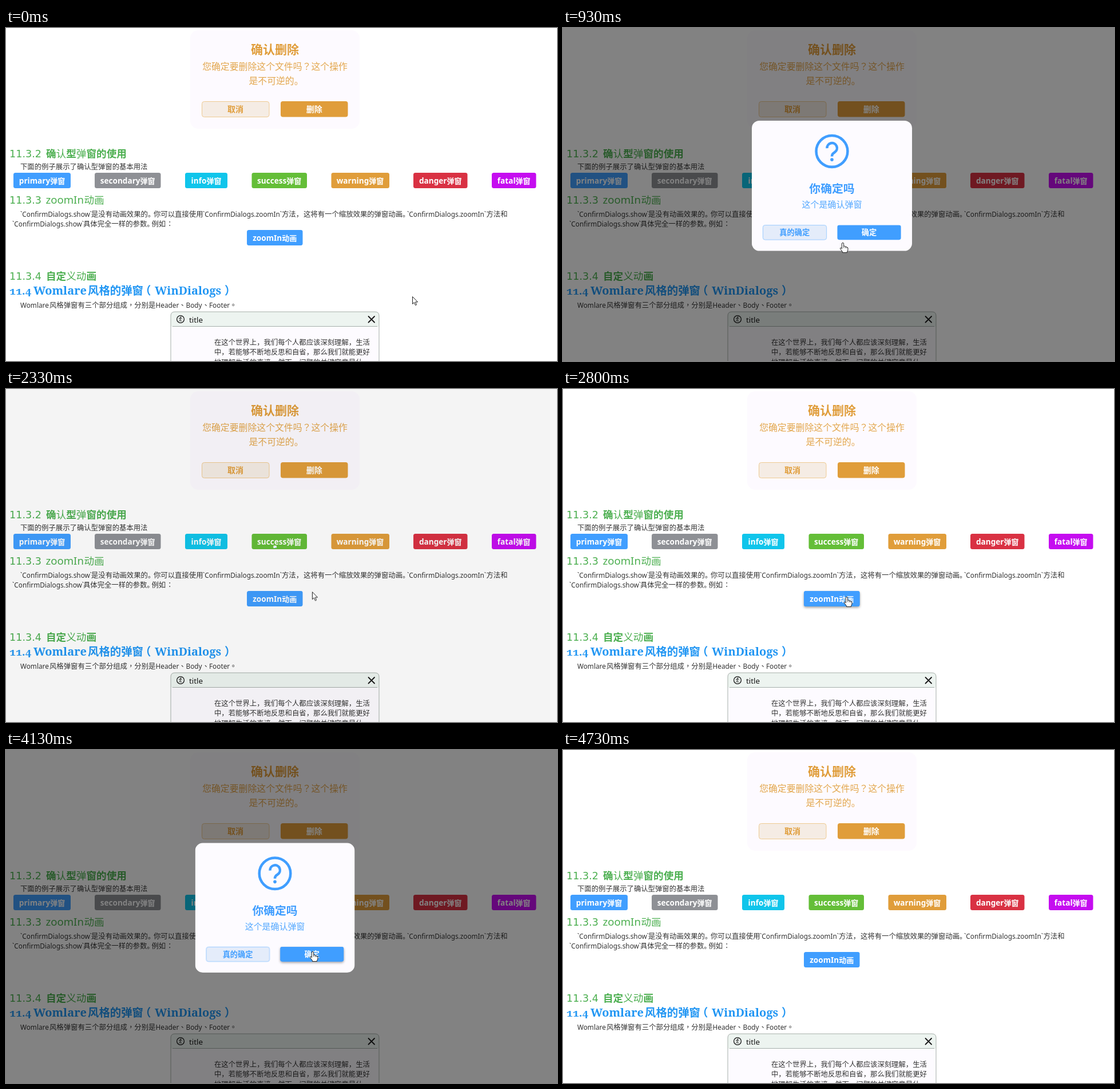
These frames come from a looping animation (963x582 px, 5400 ms). An HTML page:

```html
<!DOCTYPE html>
<html lang="zh-CN">
<head>
<meta charset="utf-8">
<title>弹窗动画</title>
<style>
html, body { margin: 0; width: 100%; height: 100%; overflow: hidden; background: #fff; }
svg { display: block; width: 963px; height: 582px; }
text { font-family: "Noto Sans", "Noto Sans CJK SC", sans-serif; white-space: pre; text-spacing-trim: space-all; }
.mid { text-anchor: middle; }
.body { font-size: 12.36px; font-weight: 300; fill: #333; }
.lat { font-size: 11.8px; font-weight: 400; }
.tc { font-family: "Noto Sans CJK TC", "Noto Sans CJK SC", sans-serif; }
.h3 { font-family: "DejaVu Sans", "Noto Sans CJK SC", sans-serif; font-size: 17.6px; fill: #4caf50; }
.h3 .word { font-family: "Noto Sans", sans-serif; font-size: 18.6px; }
.h2 { font-family: "Noto Serif", serif; font-size: 20px; font-weight: 700; fill: #2196f3; font-variant-numeric: oldstyle-nums; }
.h2 .cjk { font-family: "Noto Sans CJK SC", sans-serif; font-size: 19.4px; font-weight: 600; }
.bold { font-weight: 700; }
.thin { font-weight: 300; }
.btn { font-size: 13.6px; font-weight: 600; fill: #fff; }
.btn tspan { font-size: 13px; }
.title { font-size: 21px; font-weight: 700; }
.sub { font-size: 15.87px; font-weight: 300; fill-opacity: .9; }
.act { font-size: 14px; font-weight: 700; }
.shade { filter: drop-shadow(0 2px 2px rgba(0,0,0,.38)); }

#veil, #dialog, #cursor, .arrow, .hand, .shade { animation: 5400ms infinite both; }
#veil { animation-name: veil; }
#dialog { animation-name: zoom; transform-origin: 470px 275.7px; }
#cursor { animation-name: move; }
.arrow { animation-name: arrow; animation-timing-function: step-end; }
.hand { animation-name: hand; animation-timing-function: step-end; }
.shade { animation-timing-function: step-end; }
#zoomShade { animation-name: hoverZoom; }
#leftShade { animation-name: hoverLeft; }
#rightShade { animation-name: hoverRight; }

@keyframes veil {
  0%, 12.593% { opacity: 0; animation-timing-function: ease; }
  18.148%, 38.148% { opacity: .5; animation-timing-function: cubic-bezier(.75,0,.75,.9); }
  43.704%, 56.15% { opacity: 0; animation-timing-function: ease; }
  61.71%, 75.556% { opacity: .5; animation-timing-function: cubic-bezier(.75,0,.75,.9); }
  81.111%, 100% { opacity: 0; }
}
@keyframes zoom {
  0%, 12.593%, 43.704%, 56.15%, 81.111%, 100% { transform: scale(0); animation-timing-function: ease-in-out; }
  18.148%, 38.148%, 61.71%, 75.556% { transform: scale(1); animation-timing-function: ease-in-out; }
}
@keyframes move {
  0%, 1.1% { transform: translate(710px,469px); animation-timing-function: ease-in-out; }
  11.1%, 23.5% { transform: translate(489px,375px); animation-timing-function: ease-in-out; }
  27.2% { transform: translate(441px,361px); animation-timing-function: linear; }
  30% { transform: translate(440px,358px); animation-timing-function: ease-in; }
  32.04% { transform: translate(518px,352px); animation-timing-function: ease-out; }
  33.33% { transform: translate(541px,352px); }
  34.63%, 40.7% { transform: translate(542px,352px); animation-timing-function: ease-in-out; }
  48.15% { transform: translate(511px,362px); animation-timing-function: ease-out; }
  51.85%, 61.1% { transform: translate(496px,363px); animation-timing-function: ease-in-out; }
  66.67% { transform: translate(535px,353px); }
  69%, 76.5% { transform: translate(536px,352px); animation-timing-function: ease-in-out; }
  86.48%, 87.58% { transform: translate(178px,559px); opacity: 1; animation-timing-function: step-end; }
  87.59%, 99.99% { transform: translate(178px,559px); opacity: 0; animation-timing-function: step-end; }
  100% { transform: translate(710px,469px); opacity: 1; }
}
@keyframes arrow {
  0%, 42.6%, 78%, 100% { opacity: 1; }
  10.4%, 47.4% { opacity: 0; }
}
@keyframes hand {
  0%, 42.6%, 78%, 100% { opacity: 0; }
  10.4%, 47.4% { opacity: 1; }
}
@keyframes hoverZoom {
  0%, 28%, 65%, 100% { opacity: 0; }
  10.7%, 48.2% { opacity: 1; }
}
@keyframes hoverLeft {
  0%, 32.8%, 100% { opacity: 0; }
  26.5% { opacity: 1; }
}
@keyframes hoverRight {
  0%, 43.8%, 82%, 100% { opacity: 0; }
  33%, 66% { opacity: 1; }
}
</style>
</head>
<body>
<svg viewBox="0 0 963 582" xmlns="http://www.w3.org/2000/svg">
  <rect width="963" height="582" fill="#fff"/>

  <!-- warning panel -->
  <rect x="322" y="4" width="296" height="172" rx="14" fill="#fdfaff"/>
  <g class="mid" fill="#e09d3a">
    <text class="title" x="470" y="44.8">确认删除</text>
    <text class="sub" x="470" y="73">您确定要删除这个文件吗<tspan class="tc" lang="zh-Hant">？</tspan>这个操作</text>
    <text class="sub" x="472" y="97.7">是不可逆的。</text>
    <rect x="342.5" y="128.5" width="117.5" height="27" rx="4" fill="#f5ece4" stroke="#efcb92"/>
    <rect x="480" y="128" width="117.5" height="27.5" rx="4"/>
    <text class="act" x="401" y="147.3">取消</text>
    <text class="act" x="538.7" y="147.3" fill="#fff">删除</text>
  </g>

  <!-- confirm section -->
  <text class="h3" y="225.7"><tspan x="6">11.3.2</tspan><tspan class="bold" x="70">确</tspan><tspan class="thin">认</tspan><tspan class="bold">型</tspan><tspan class="thin">弹</tspan><tspan class="bold">窗的使用</tspan></text>
  <text class="body" x="25" y="247.3">下面的例子展示了确认型弹窗的基本用法</text>
  <g>
    <rect x="13" y="253" width="100" height="27" rx="3.5" fill="#409eff"/>
    <rect x="155" y="253" width="115.5" height="27" rx="3.5" fill="#8e9095"/>
    <rect x="313" y="253" width="74" height="27" rx="3.5" fill="#10c5eb"/>
    <rect x="429.5" y="253" width="96.5" height="27" rx="3.5" fill="#64be38"/>
    <rect x="568.5" y="253" width="101.5" height="27" rx="3.5" fill="#e09d3a"/>
    <rect x="712" y="253" width="94.5" height="27" rx="3.5" fill="#d93143"/>
    <rect x="849" y="253" width="77.5" height="27" rx="3.5" fill="#c50df0"/>
  </g>
  <g class="btn mid">
    <text x="63" y="272">primary<tspan>弹窗</tspan></text>
    <text x="212.7" y="272">secondary<tspan>弹窗</tspan></text>
    <text x="350" y="272">info<tspan>弹窗</tspan></text>
    <text x="477.7" y="272">success<tspan>弹窗</tspan></text>
    <text x="619" y="272">warning<tspan>弹窗</tspan></text>
    <text x="759.2" y="272">danger<tspan>弹窗</tspan></text>
    <text x="887.7" y="272">fatal<tspan>弹窗</tspan></text>
  </g>

  <!-- zoomIn section -->
  <text class="h3" y="307.3"><tspan x="6">11.3.3</tspan><tspan class="word" x="69.5">zoomIn</tspan><tspan x="136.5">动画</tspan></text>
  <text class="body" y="330"><tspan class="lat" x="25">`ConfirmDialogs.show`</tspan><tspan x="149">是没有动画效果的。</tspan><tspan x="258">你可以直接使用</tspan><tspan class="lat" x="344">`ConfirmDialogs.zoomIn`</tspan><tspan x="482">方法，</tspan><tspan x="520">这将有一个缩放效果的弹窗动画。</tspan><tspan class="lat" x="701">`ConfirmDialogs.zoomIn`</tspan><tspan x="839.5">方法和</tspan></text>
  <text class="body" y="347.3"><tspan class="lat" x="11">`ConfirmDialogs.show`</tspan><tspan x="135">具体完全一样的参数。</tspan><tspan x="254.5">例如</tspan><tspan class="tc" lang="zh-Hant" x="280">：</tspan></text>
  <rect id="zoomShade" class="shade" x="421" y="353" width="97.5" height="27" rx="3.5" fill="#409eff"/>
  <rect x="421" y="353" width="97.5" height="27" rx="3.5" fill="#409eff"/>
  <text class="btn mid" x="469.7" y="372">zoomIn<tspan>动画</tspan></text>

  <!-- lower headings -->
  <text class="h3" y="440"><tspan x="6">11.3.4</tspan><tspan class="bold" x="70">自定</tspan><tspan class="thin">义动</tspan><tspan class="bold">画</tspan></text>
  <text class="h2" y="466"><tspan x="6" font-size="18.8">11.4</tspan><tspan x="48">Womlare</tspan><tspan class="cjk" x="143">风格的弹窗</tspan><tspan class="cjk" x="234">（</tspan><tspan x="260">WinDialogs</tspan><tspan class="cjk" x="382">）</tspan></text>
  <text class="body" y="489.2"><tspan class="lat" x="25">Womlare</tspan><tspan x="76">风格弹窗有三个部分组成</tspan><tspan class="tc" lang="zh-Hant" x="212">，</tspan><tspan x="224.3">分别是</tspan><tspan class="lat" x="261.5">Header</tspan><tspan class="tc" lang="zh-Hant" x="302">、</tspan><tspan class="lat" x="314.5">Body</tspan><tspan class="tc" lang="zh-Hant" x="343">、</tspan><tspan class="lat" x="355">Footer</tspan><tspan class="tc" lang="zh-Hant" x="391">。</tspan></text>

  <!-- window -->
  <path d="M288 590V503q0-7 7-7H645q7 0 7 7V590Z" fill="#fdfbff"/>
  <path d="M288 522V503q0-7 7-7H645q7 0 7 7V522Z" fill="#edf4f0"/>
  <path d="M288 590V503q0-7 7-7H645q7 0 7 7V590M291 521.5H649" fill="none" stroke="#a6afaa"/>
  <g fill="none" stroke="#151515" stroke-linecap="round">
    <circle cx="305" cy="509" r="6.4" stroke-width="1.3"/>
    <path d="M302.3 508l2-1.4 1.4.3 1.6 1.6M305 507l-.6 2.6 1.4 1.2v2M304.2 510l-1.5 2.3" stroke-width="1"/>
    <path d="M633.5 504l10.5 10.5M644 504l-10.5 10.5" stroke-width="1.8"/>
  </g>
  <circle cx="305.6" cy="505.2" r=".9" fill="#151515"/>
  <text x="320" y="514.7" font-size="13.4" fill="#151515">title</text>
  <g class="body">
    <text x="364" y="553.7">在这个世界上，我们每个人都应该深刻理解，生活</text>
    <text x="364" y="571.2">中，若能够不断地反思和自省，那么我们就能更好</text>
    <text x="364" y="588.5">地理解生活的真谛。然而，问题的关键究竟是什</text>
  </g>

  <rect id="veil" width="963" height="582"/>

  <g id="dialog">
    <rect x="322" y="155.5" width="296" height="240.5" rx="14" fill="#fdfbff"/>
    <g fill="none" stroke="#409eff" stroke-width="4.8">
      <circle cx="470" cy="212" r="29"/>
      <path d="M461 206.5a9.2 9.2 0 1 1 14.2 7.2c-3.4 2.2-5.2 3.6-5.2 7.8"/>
    </g>
    <circle cx="470" cy="227.5" r="3" fill="#409eff"/>
    <g class="mid" fill="#409eff">
      <text class="title" x="470" y="289.2">你确定吗</text>
      <text class="sub" x="470" y="316">这个是确认弹窗</text>
      <rect id="leftShade" class="shade" x="342" y="348" width="118" height="28" rx="4"/>
      <rect x="342.5" y="348.5" width="117.5" height="27" rx="4" fill="#e4ecfa" stroke="#96c9ff"/>
      <rect id="rightShade" class="shade" x="480" y="348.3" width="117.5" height="27.2" rx="3.5"/>
      <rect x="480" y="348.3" width="117.5" height="27.2" rx="3.5"/>
      <text class="act" x="401" y="367.3">真的确定</text>
      <text class="act" x="538.7" y="367.3" fill="#fff">确定</text>
    </g>
  </g>

  <g id="cursor" fill="#fff" stroke="#222" stroke-linejoin="round">
    <path class="arrow" d="M.5.5V13.3L3.4 10.6 5.5 15.6 7.6 14.7 5.5 9.9H9.6Z"/>
    <g class="hand">
      <path d="M-1.6 10.8V2a1.6 1.6 0 0 1 3.2 0V6.2q2.6-.6 2.8 1 2.3-.5 2.5 1 2.1-.2 2.1 1.7V12q0 2.3-1.5 3.8V17.5H-.6V16L-4.2 11.2q-.9-1.7.4-2.2 1-.2 2.2 1.8Z"/>
      <path d="M1.6 6.2V9.4M4.4 7.2V9.8M6.9 8.2V10.2" fill="none" stroke-width=".8"/>
    </g>
  </g>
</svg>
</body>
</html>
```
